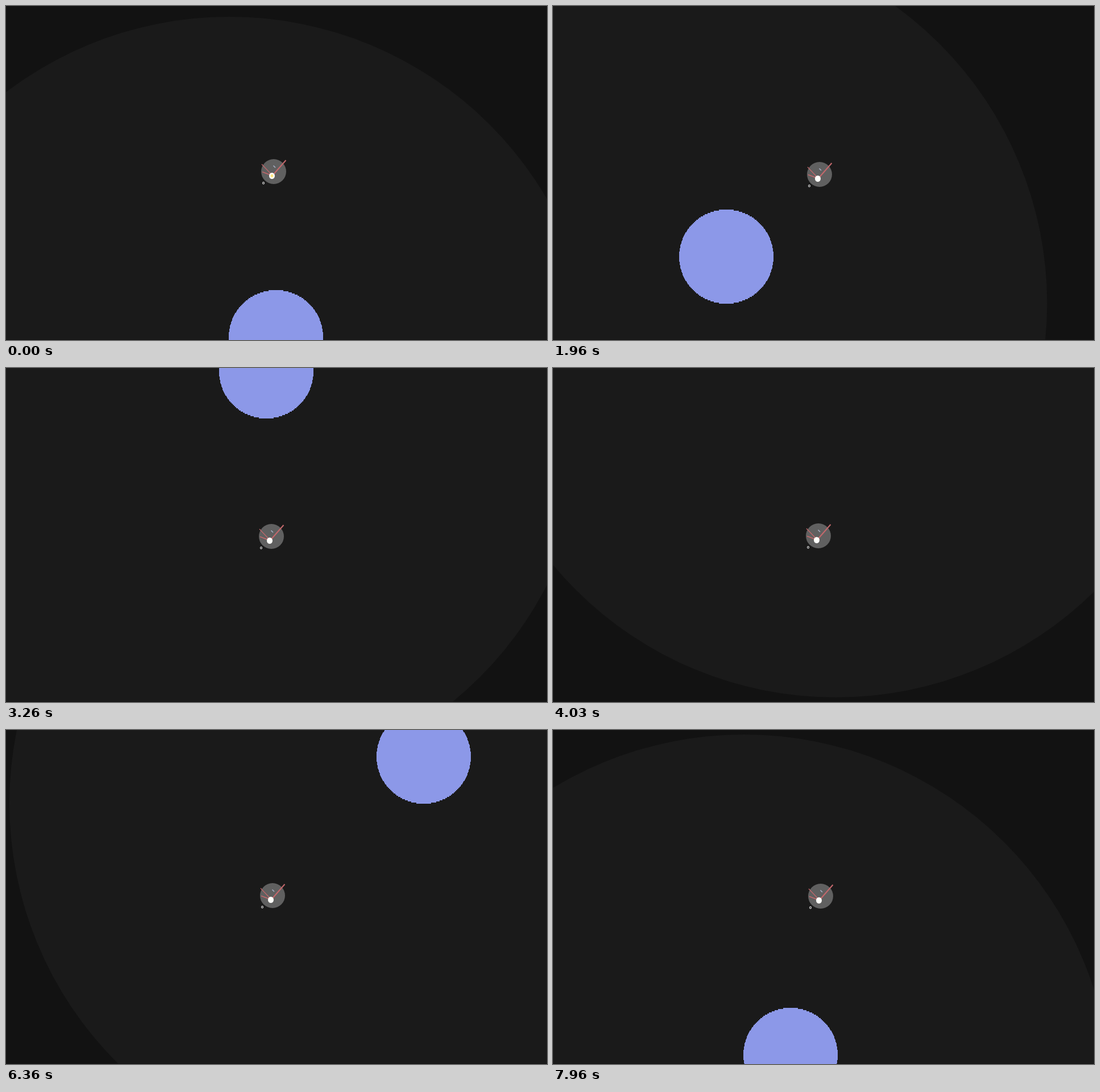
An HTML page with a canvas for the animation above (8 s loop, 952 by 589 pixels).

```html
<!DOCTYPE html>
<html>
<head>
<meta charset="utf-8">
<style>
html, body { margin: 0; width: 100%; height: 100%; overflow: hidden; background: #121212; }
canvas { display: block; }
</style>
</head>
<body>
<canvas id="stage" width="952" height="589"></canvas>
<script>
const ctx = document.getElementById('stage').getContext('2d');
const WIDTH = 952, HEIGHT = 589, LOOP = 8000, TICK = 68;
const DARK = '#121212', LIT = '#1a1a1a', BLUE = '#8c98e8', PINK = '#c4686c';

// Key points as time, x, y
const orbPath = [
  [0, 475.5, 584], [884, 367, 598], [1972, 305, 442], [2516, 338, 263], [3264, 458.5, 6],
  [4700, 675, -197], [5644, 752, -116], [6392, 735.5, 47], [7344, 584.5, 372.5], [7956, 418.5, 573]
];
const playerPath = [
  [0, 471, 292], [884, 471, 295], [3264, 467, 297], [4860, 467.5, 294.4],
  [5644, 469, 294], [6392, 469, 292], [7956, 471, 293]
];

// Smooth curve through the key points
function locate(keys, t) {
  const end = keys.length - 1;
  let i = 0;
  while (i < end - 1 && keys[i + 1][0] <= t) i++;
  const span = keys[i + 1][0] - keys[i][0];
  const u = Math.min(1, (t - keys[i][0]) / span), v = 1 - u;

  return [1, 2].map(axis => {
    const chord = j => (keys[j + 1][axis] - keys[j][axis]) / (keys[j + 1][0] - keys[j][0]);
    const slope = j => {
      if (j === 0) return chord(0);
      if (j === end) return chord(end - 1);
      const w = (keys[j][0] - keys[j - 1][0]) / (keys[j + 1][0] - keys[j - 1][0]);
      return chord(j - 1) * (1 - w) + chord(j) * w;
    };
    return keys[i][axis] * v * v * (1 + 2 * u) + keys[i + 1][axis] * u * u * (1 + 2 * v)
      + span * u * v * (slope(i) * v - slope(i + 1) * u);
  });
}

function ellipse(x, y, rx, ry, color) {
  ctx.fillStyle = color;
  ctx.beginPath();
  ctx.ellipse(x, y, rx, ry, 0, 0, Math.PI * 2);
  ctx.fill();
}

function line(x1, y1, x2, y2, width, color) {
  ctx.strokeStyle = color;
  ctx.lineWidth = width;
  ctx.beginPath();
  ctx.moveTo(x1, y1);
  ctx.lineTo(x2, y2);
  ctx.stroke();
}

// A disc of two-pixel rows, for its stepped edge
function drawOrb(cx, cy) {
  const r = 83, left = Math.floor(cx - r), top = Math.floor(cy - r);
  ctx.fillStyle = BLUE;
  for (let row = 0; row < r; row++) {
    const dy = 2 * row + 1 - r;
    const inset = Math.round(r - Math.sqrt(r * r - dy * dy));
    ctx.fillRect(left + inset, top + 2 * row, 2 * (r - inset), 2);
  }
}

function drawPlayer(x, y, glowing) {
  ctx.save();
  ctx.translate(Math.round(x), Math.round(y));
  ellipse(0, 0, 22, 22, '#606060');
  line(-3, 6, -21, -13, 1.2, PINK);
  line(-3, 7, -20, 0.5, 1.8, PINK);
  line(-1.2, 6, 21.5, -20, 2, PINK);
  line(-0.5, -10.5, 3, -7, 1.6, '#a9afc4');
  ellipse(-3, 7.5, 5, 5.6, '#fffffa');
  if (glowing) ellipse(-3, 7.5, 2.4, 2.8, '#ffe680');
  ellipse(-18, 20.3, 1.9, 2.2, '#f4f4f4');
  ellipse(-18, 20.3, 0.9, 1.2, LIT);
  ctx.restore();
}

function frame(now) {
  const t = Math.round(now % LOOP / TICK) * TICK;
  const [x, y] = locate(orbPath, t);
  ctx.fillStyle = DARK;
  ctx.fillRect(0, 0, WIDTH, HEIGHT);
  ellipse(x - 82.5, y + 82, 647, 647, LIT);
  ctx.fillStyle = DARK;
  ctx.fillRect(0, HEIGHT - 1, WIDTH, 1);
  drawOrb(x, y);
  drawPlayer(...locate(playerPath, t), t === 0);
  requestAnimationFrame(frame);
}
requestAnimationFrame(frame);
</script>
</body>
</html>
```
